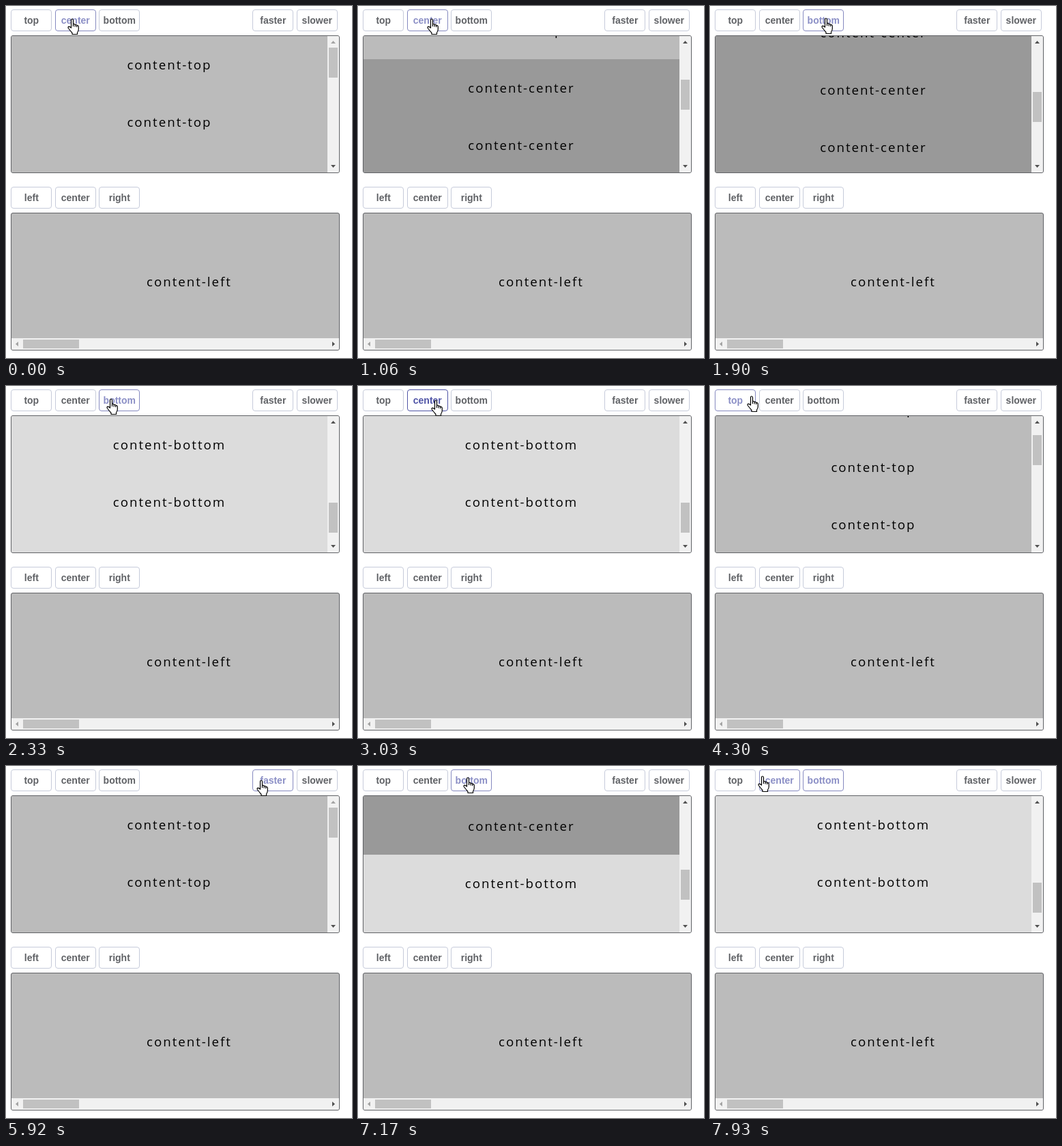
Write an HTML page that moves like this. It is 507 px wide and 516 px high and loops after 8 s.

```html
<!DOCTYPE html>
<html lang="en">
<head>
<meta charset="utf-8">
<style>
  html, body { margin: 0; width: 100%; height: 100%; overflow: hidden; background: #fff; }
  body * { position: absolute; box-sizing: border-box; }
  .btn { width: 60px; height: 32px; border: 1px solid #c6cbda; border-radius: 4px; color: #606266;
    font: bold 14px/30px "Liberation Sans", Arial, sans-serif; text-align: center; }
  .btn.lit { color: #8b8fc6; border-color: #8589c0; }
  .btn.down { color: #4f54a6; border-color: #4f54a6; }
  .panel { left: 7px; width: 482px; height: 202px; border: 1px solid #606266; border-radius: 3px;
    overflow: hidden; background: #bbb; }
  #content { left: 0; top: 0; width: 463px; }
  .section { left: 0; width: 463px; height: 252px; }
  .line { left: 0; width: 100%; text-align: center; color: #000; white-space: nowrap;
    font: 18.7px/84px "Open Sans", "Noto Sans", sans-serif; letter-spacing: 2px; }
  .bar { background: #f1f1f1; }
  .thumb { background: #c1c1c1; }
  svg { left: 0; top: 0; overflow: visible; }
</style>
</head>
<body>
<div class="panel" style="top:43px">
  <div id="content"></div>
  <div class="bar" style="left:463px;top:0;width:17px;height:200px">
    <div class="thumb" id="thumb" style="left:2px;top:17px;width:13px;height:44px"></div>
    <svg width="17" height="200">
      <path id="up" d="M5 11h7L8.500 7z"/>
      <path fill="#505050" d="M5 189h7l-3.500 4z"/>
    </svg>
  </div>
</div>
<div class="panel" style="top:303px">
  <div class="line" style="width:521px;line-height:200px">content-left</div>
  <div class="bar" style="left:0;top:183px;width:480px;height:17px">
    <div class="thumb" style="left:17px;top:2px;width:82px;height:13px"></div>
    <svg width="480" height="17">
      <path fill="#a3a3a3" d="M10 5v7L6 8.500z"/>
      <path fill="#505050" d="M470 5v7l4-3.500z"/>
    </svg>
  </div>
</div>
<svg id="hand" width="18" height="25" stroke="#000" stroke-width="1.2" stroke-linejoin="round">
  <path fill="#fff" d="M5.500 14V3Q5.500 1 7 1T8.500 3V8.500Q11 8 11.200 9.500Q13.400 9 13.700 10.500Q16 10 16.300 12.500V16.500Q16 19 14.500 21V23.500H7V21.500Q4 18 1.300 14.500Q.5 12.500 2 12.200Q3.800 12.200 5.500 14Z"/>
  <path fill="none" d="M8.500 8.500V12M11.200 9.500V12.500M13.700 10.500V13"/>
</svg>
<script>
const LOOP = 8000, FRAME = 130, SECTION = 252, REACTION = 160;
const $ = id => document.getElementById(id);

function add(parent, cls, text, style) {
  const el = document.createElement('div');
  el.className = cls;
  el.textContent = text;
  Object.assign(el.style, style);
  return parent.insertBefore(el, parent === document.body ? $('hand') : null);
}

const row = (names, x0, y) => names.map((name, i) => {
  const x = x0 + i * 64.5;
  return { name, x, y, el: add(document.body, 'btn', name, { left: x + 'px', top: y + 'px' }) };
});
const places = ['top', 'center', 'bottom'];
const buttons = [...row(places, 7.3, 5), ...row(['faster', 'slower'], 361.3, 5)];
row(['left', 'center', 'right'], 7.3, 265);

places.forEach((name, i) => {
  const section = add($('content'), 'section', '',
    { top: i * SECTION + 'px', background: ['#bbb', '#999', '#dcdcdc'][i] });
  for (let k = 0; k < 3; k++) add(section, 'line', 'content-' + name, { top: k * 84 + 'px' });
});

// Each click scrolls to its section after `lag` ms, then the hand travels to x, y until `end`
const clicks = [
  { at: 0, end: 500, x: 90, y: 18 },
  { at: 780, name: 'center', lag: 0, end: 1630, x: 163, y: 17 },
  { at: 1900, name: 'bottom', lag: -56, end: 2880, x: 107, y: 20 },
  { at: 3030, name: 'center', lag: 0, end: 4030, x: 54, y: 14 },
  { at: 4160, name: 'top', lag: -109, end: 5060, x: 391, y: 20 },
  { at: 5610, name: 'faster', end: 6750, x: 154, y: 16 },
  { at: 7030, name: 'bottom', lag: -36, quick: true, end: 7930, x: 54, y: 14 },
];
let offset = 0;
for (const c of clicks) {
  const i = places.indexOf(c.name);
  c.from = offset;
  c.to = offset = i < 0 ? offset : i * SECTION;
}

const mix = (a, b, p) => Math.round(a + (b - a) * Math.min(1, Math.max(0, p)));

function draw(now) {
  const t = now % LOOP;
  const i = clicks.filter(c => c.at <= t).length - 1;
  const click = clicks[i], before = clicks[Math.max(0, i - 1)];
  const age = Math.floor((t - click.at) / FRAME) * FRAME;

  const travel = (age - REACTION) / (click.end - click.at - REACTION);
  const x = mix(before.x, click.x, travel), y = mix(before.y, click.y, travel);
  const s = mix(click.from, click.to, (age - (click.lag || 0)) / (click.quick ? 200 : 300));

  $('hand').style.transform = `translate(${x}px,${y}px)`;
  $('content').style.transform = `translateY(${-s}px)`;
  $('thumb').style.top = 17 + Math.floor(s * 122 / 556) + 'px';
  $('up').setAttribute('fill', s ? '#505050' : '#a3a3a3');
  for (const b of buttons) {
    const dx = x + 7 - b.x, dy = y + 1 - b.y;
    const hover = dx >= 0 && dx < 60 && dy >= 0 && dy < 32;
    const focus = b.name === click.name;
    const down = focus && click.lag === 0 && age === 0;
    b.el.className = 'btn' + (down ? ' down' : hover || focus ? ' lit' : '');
  }
}

const begin = performance.now();
(function tick() {
  draw(performance.now() - begin);
  requestAnimationFrame(tick);
})();
</script>
</body>
</html>
```
